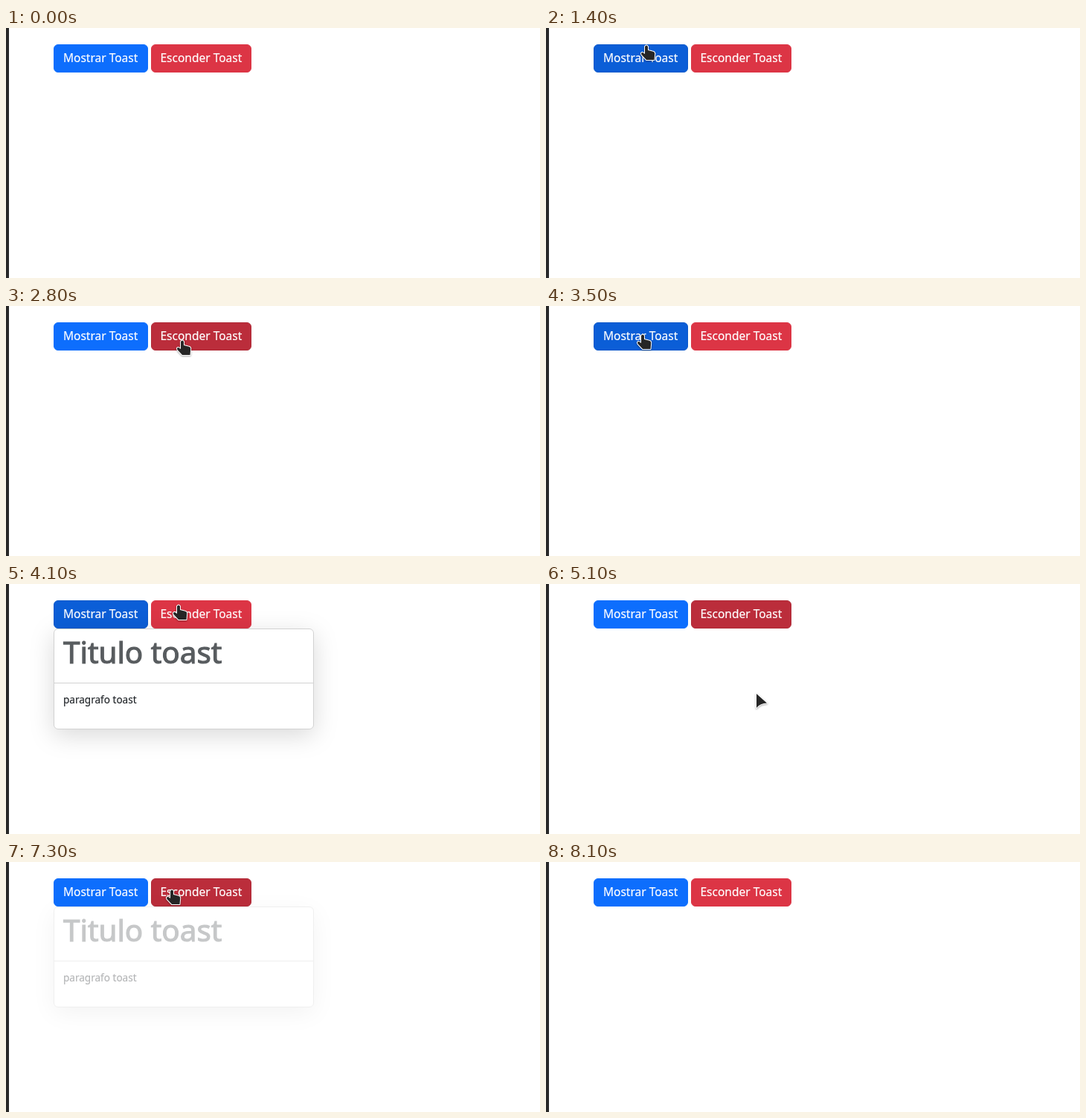
An HTML page for the animation above (8500 ms loop, 718x337 px).

```html
<!DOCTYPE html>
<html lang="pt">
<head>
<meta charset="utf-8">
<style>
html, body { margin: 0; height: 100%; overflow: hidden; background: #fff; }
svg { display: block; font-family: "Noto Sans", "Open Sans", sans-serif; }
.btn text { fill: #fff; stroke: #fff; stroke-width: .2; font-size: 15.5px; }
.blue rect { fill: #0d6efd; stroke: #0d6efd; }
.blue.hover rect { fill: #0b5ed7; stroke: #0a58ca; }
.red rect { fill: #dc3545; stroke: #dc3545; }
.red.hover rect { fill: #bb2d3b; stroke: #b02a37; }
.card { fill: #fff; stroke: #d2d2d2; filter: drop-shadow(0 8px 16px rgba(0,0,0,.15)); }
.title { font-size: 40.4px; fill: #585c5f; stroke: #585c5f; stroke-width: 1.1; }
.body { font-size: 13.55px; fill: #212529; stroke: #212529; stroke-width: .15; }
#cursor { fill: #262626; stroke: #fff; stroke-linejoin: round; paint-order: stroke; stroke-width: 2; filter: drop-shadow(0 1px 1px rgba(0,0,0,.35)); }
</style>
</head>
<body>
<svg width="718" height="337">
  <rect width="4" height="337" fill="#282828"/>
  <g class="btn blue" id="show">
    <rect x="64.5" y="22.5" width="126" height="37" rx="5.5"/>
    <text x="77" y="46">Mostrar Toast</text>
  </g>
  <g class="btn red" id="hide">
    <rect x="195.5" y="22.5" width="134" height="37" rx="5.5"/>
    <text x="207.5" y="46">Esconder Toast</text>
  </g>
  <g id="toast">
    <rect class="card" x="64.5" y="60.5" width="349" height="135" rx="5.5"/>
    <path d="M65 133.5H413" stroke="#d2d2d2"/>
    <text class="title" x="77" y="107">Titulo toast</text>
    <text class="body" x="77" y="161">paragrafo toast</text>
  </g>
  <path id="cursor"/>
</svg>
<script>
const LOOP = 8500, STEP = 100, FADE = 300, ENTER = 800, LEAVE = 8000;
const ARROW = "M1 1L15 13.5Q6 13.5 1 20Z";
const HAND = "M-2 2Q0-1 2 2V7L8 8.5Q11.5 9 11.2 12L10.5 20H0L-6.5 13Q-8 10-5 10L-2 12Z";

// when the toast is called up and sent away
const visits = [[1600, 2500], [3500, 4400], [6500, 7100]];

// pointer glides: start, end, x and y reached
const glides = [
  [800, 1300, 135, 23], [1400, 1600, 128, 38], [1800, 2100, 231, 50], [2200, 2300, 237, 46],
  [2800, 3300, 130, 38], [3900, 4100, 232, 28], [4100, 4300, 237, 41], [5000, 5100, 282, 147],
  [5100, 5400, 305, 345], [5400, 5900, 182, 172], [5900, 6300, 132, 40], [6400, 6500, 247.5, 62],
  [6500, 6800, 223, 37], [7500, 7900, 90, 28], [7900, 8000, 32, 0]
];

const $ = id => document.getElementById(id);
const ramp = (t, from, to) => Math.min(1, Math.max(0, (t - from) / (to - from)));
const smooth = u => u * u * (3 - 2 * u);

function pointer(t) {
  let x = 150, y = 108;
  for (const [from, to, toX, toY] of glides) {
    const u = smooth(ramp(t, from, to));
    x += (toX - x) * u;
    y += (toY - y) * u;
  }
  return [x, y];
}

const present = t => t >= ENTER && t <= LEAVE;

function hovered(t) {
  const [x, y] = pointer(t);
  if (!present(t) || y < 22 || y > 60) return "";
  return x >= 64 && x <= 191 ? "show" : x >= 195 && x <= 330 ? "hide" : "";
}

const opacity = t => Math.max(...visits.map(([on, off]) =>
  ramp(t, on, on + FADE) - ramp(t, off, off + FADE)));

function draw(now) {
  const t = Math.floor(now % LOOP / STEP) * STEP;
  // button colours trail the pointer by one step
  const lit = present(t) ? hovered(t - STEP) : "";
  for (const id of ["show", "hide"]) $(id).classList.toggle("hover", lit === id);
  $("toast").style.opacity = opacity(t);

  const [x, y] = pointer(t), cursor = $("cursor");
  cursor.style.display = present(t) ? "" : "none";
  cursor.setAttribute("d", hovered(t) ? HAND : ARROW);
  cursor.setAttribute("transform", `translate(${x} ${y})`);
}

const start = performance.now();
function tick() {
  draw(performance.now() - start);
  requestAnimationFrame(tick);
}
tick();
</script>
</body>
</html>
```
